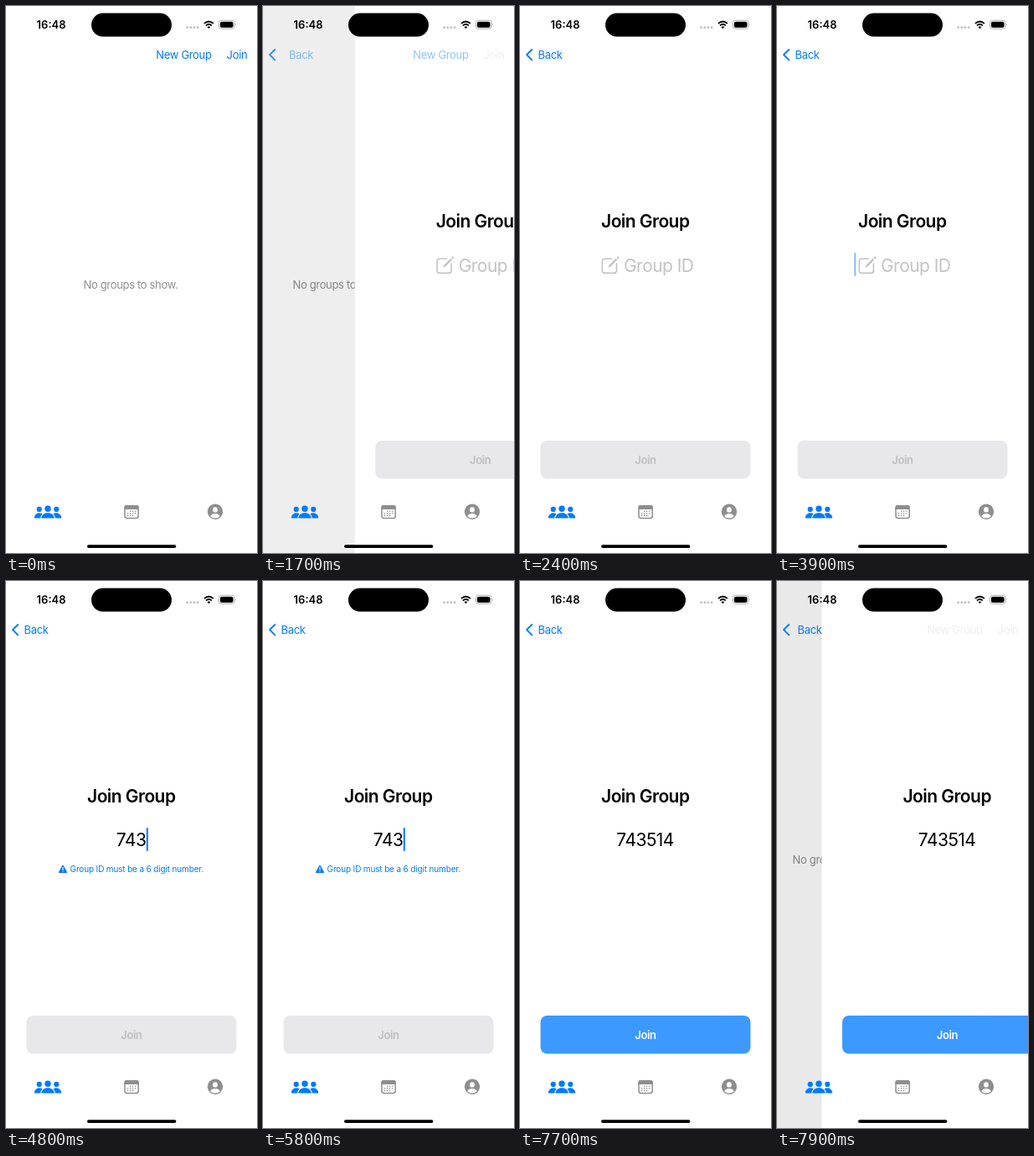
These frames come from a looping animation (300 by 652 pixels, 8 s). An HTML page:

```html
<!DOCTYPE html>
<html lang="en">
<head>
<meta charset="utf-8">
<title>Join Group</title>
<style>
html, body { margin: 0; width: 100%; height: 100%; overflow: hidden; background: #fff; }
svg { display: block; width: 300px; height: 652px; }
text { font: 13px Inter, "Noto Sans", sans-serif; font-optical-sizing: none; letter-spacing: -.026em; white-space: pre; }
.big { font-size: 21px; }
.bold { font-weight: 600; }
.mid { text-anchor: middle; }
.blue { fill: #007aff; }
.gray { fill: #8e8e91; }
</style>
</head>
<body>
<svg viewBox="0 0 300 652" xmlns="http://www.w3.org/2000/svg">
  <rect width="300" height="652" fill="#fff"/>

  <g id="list">
    <text x="92.5" y="336.5" class="gray">No groups to show.</text>
  </g>
  <rect id="dim" width="300" height="652"/>

  <g id="page">
    <rect width="300" height="652" fill="#fff"/>
    <text x="97" y="263.7" class="big bold">Join Group</text>
    <g id="hint" fill="#c3c3c6">
      <path d="M109.5 301.3H101.5Q98.3 301.3 98.3 304.5V315.2Q98.3 318.4 101.5 318.4H112.2Q115.4 318.4 115.4 315.2V307" fill="none" stroke="#c3c3c6" stroke-width="1.6" stroke-linecap="round"/>
      <path d="M105.4 311.8L106.4 308.9L114.6 300.7L116.4 302.5L108.2 310.7ZM115.4 299.9L116.5 298.8Q117.4 298.1 118.2 298.9Q118.9 299.8 118.2 300.6L117.2 301.7Z"/>
      <text x="124" y="316.5" class="big">Group ID</text>
    </g>
    <text id="code" x="149.6" y="315.7" class="big mid"></text>
    <rect id="caret" y="294" width="2" height="28" rx="1" class="blue"/>
    <g id="error" class="blue">
      <path d="M68 339.6L72.1 347.2H63.9Z" stroke="#007aff" stroke-width="1.8" stroke-linejoin="round"/>
      <path d="M68 341.3V344.6M68 346.4V346.5" stroke="#fff" stroke-width="1.1" stroke-linecap="round"/>
      <text x="76.6" y="347" style="font-size:10px;letter-spacing:-.015em">Group ID must be a 6 digit number.</text>
    </g>
    <g id="button">
      <rect id="face" x="24.5" y="518" width="251" height="45.6" rx="8"/>
      <text id="label" x="150" y="546" class="mid bold">Join</text>
    </g>
  </g>

  <g id="back">
    <path d="M14.2 52L8 58.2L14.2 64.4" fill="none" stroke="#007aff" stroke-width="1.9" stroke-linecap="round" stroke-linejoin="round"/>
    <text id="backText" y="62.7" class="blue">Back</text>
  </g>
  <text id="newGroup" x="179.3" y="62.7">New Group</text>
  <text id="join" x="263.6" y="62.7">Join</text>

  <text x="36.6" y="27" class="bold" style="letter-spacing:0">16:48</text>
  <rect x="102" y="8.6" width="96" height="28" rx="14"/>
  <g id="signal" fill="#bdbdbd"></g>
  <g fill="none" stroke="#000" stroke-width="1.9">
    <path d="M236.9 20.9Q242.4 15.9 247.9 20.9"/>
    <path d="M239 23.3Q242.4 20.2 245.8 23.3"/>
  </g>
  <path d="M240.5 24.9Q242.4 23.4 244.3 24.9L242.4 26.9Z"/>
  <rect x="254.4" y="17.2" width="18.6" height="10" rx="3.2" fill="none" stroke="#a6a6a6" stroke-width=".9"/>
  <rect x="255.9" y="18.7" width="15.6" height="7" rx="2"/>
  <path d="M274.1 20.6Q275.5 22.2 274.1 23.8Z" fill="#a6a6a6"/>

  <g class="blue">
    <circle cx="50" cy="599.3" r="3.7"/>
    <path d="M42.9 610.6Q42.2 610.6 42.4 609.4C43.2 606 46.4 604.2 50 604.2S56.8 606 57.6 609.4Q57.8 610.6 57.1 610.6Z"/>
    <g id="side">
      <circle cx="39.7" cy="599.9" r="3.1"/>
      <path d="M41.3 610.6H34.6Q33.6 610.6 33.8 609.3C34.4 606.2 36.8 604.2 39.9 604.2Q42.2 604.2 43.6 605.4Q41 607.4 41.3 610.6Z"/>
    </g>
    <use href="#side" transform="matrix(-1 0 0 1 100 0)"/>
  </g>
  <g class="gray">
    <rect x="142" y="595.7" width="16.2" height="14.7" rx="2.4" fill="#fff" stroke="#8e8e91" stroke-width="1.5"/>
    <path d="M141.4 600V598Q141.4 595 144.4 595H155.8Q158.8 595 158.8 598V600Z"/>
    <g id="days"></g>
  </g>
  <circle cx="250" cy="602.8" r="9.2" class="gray"/>
  <g fill="#fff">
    <ellipse cx="250" cy="600.4" rx="2.9" ry="3.2"/>
    <path d="M244.2 608.3C245.2 606.1 247.4 605 250 605S254.8 606.1 255.8 608.3Q253.4 610.6 250 610.6T244.2 608.3Z"/>
  </g>
  <rect x="97" y="642.2" width="106.4" height="3.8" rx="1.9"/>
</svg>
<script>
const LOOP = 8000, STEP = 100;
const PUSH = 1511, POP = 7833;
const $ = id => document.getElementById(id);
const set = (id, attrs) => {
  for (const key in attrs) $(id).setAttribute(key, attrs[key]);
};
const dots = (id, cx, cy, r) => {
  $(id).innerHTML += `<circle cx="${cx}" cy="${cy}" r="${r}"/>`;
};

for (let i = 0; i < 4; i++) dots('signal', 216.6 + i * 4.15, 25.6, 1.4);
for (let row = 0; row < 3; row++) {
  for (let col = 0; col < 4; col++) {
    const skip = (row === 0 && col === 0) || (row === 2 && col === 3);
    if (!skip) dots('days', 145.6 + col * 3, 602.2 + row * 2.6, .8);
  }
}

// Typed value: start time, digit count, caret position
const typing = [
  [0, 0, 92.3], [4200, 1, 156], [4500, 2, 162], [4800, 3, 167.8],
  [6300, 4, 174.6], [6600, 5, 179.6], [6700, 6, 185.6]
];
const caretKeys = [
  [2950, 0], [3250, 1], [3550, 1], [3700, 0], [3800, 0], [4000, 1],
  [5200, 1], [5500, 0], [5600, 0], [5800, 1],
  [7000, 1], [7300, 0], [7400, 0], [7600, 1], [7700, 0]
];
const joinKeys = [[1300, 1], [1500, .3]];
const pressKeys = [[7500, 1], [7700, .76]];

// Linear interpolation over [time, value] pairs
function track(keys, t) {
  if (t <= keys[0][0]) return keys[0][1];
  for (let i = 1; i < keys.length; i++) {
    const [a, from] = keys[i - 1], [b, to] = keys[i];
    if (t <= b) return from + (to - from) * (t - a) / (b - a);
  }
  return keys[keys.length - 1][1];
}

// Critically damped spring from 0 to 1
function spring(ms) {
  if (ms <= 0) return 0;
  const x = ms * .0114, left = (1 + x) * Math.exp(-x);
  return left < .001 ? 1 : 1 - left;
}

function draw(t) {
  const popping = t > POP;
  const p = popping ? 1 - spring(t - POP) : spring(t - PUSH);

  set('list', { transform: `translate(${-90 * p})` });
  set('dim', { opacity: .107 * p });
  set('page', { transform: `translate(${300 * (1 - p)})` });

  set('back', { opacity: Math.min(1, p * 1.3) });
  set('backText', {
    x: 21.5 + (popping ? 17 : 26) * (1 - p),
    opacity: popping ? 1 : Math.max(0, 1 - 1.2 * (1 - p))
  });
  const fade = popping ? .8 * (1 - p) : 1 - p ** 1.3;
  set('newGroup', { opacity: fade, fill: popping ? '#888' : '#007aff' });
  set('join', {
    opacity: popping ? fade : fade * track(joinKeys, t),
    fill: p > 0 ? '#888' : '#007aff'
  });

  const [, count, caretX] = typing.filter(k => k[0] <= t).pop();
  const ready = count === 6;
  $('code').textContent = '743514'.slice(0, count);
  set('hint', { opacity: count ? 0 : 1 });
  set('error', { opacity: count && !ready ? 1 : 0 });
  set('caret', { x: caretX, opacity: track(caretKeys, t) });
  set('button', { opacity: track(pressKeys, t) });
  set('face', { fill: ready ? '#007aff' : '#e8e8ea' });
  set('label', { fill: ready ? '#fff' : '#bebec2' });
}

const start = performance.now();
function tick() {
  const t = (performance.now() - start) % LOOP;
  draw(Math.floor(t / STEP) * STEP);
  requestAnimationFrame(tick);
}
tick();
</script>
</body>
</html>
```
